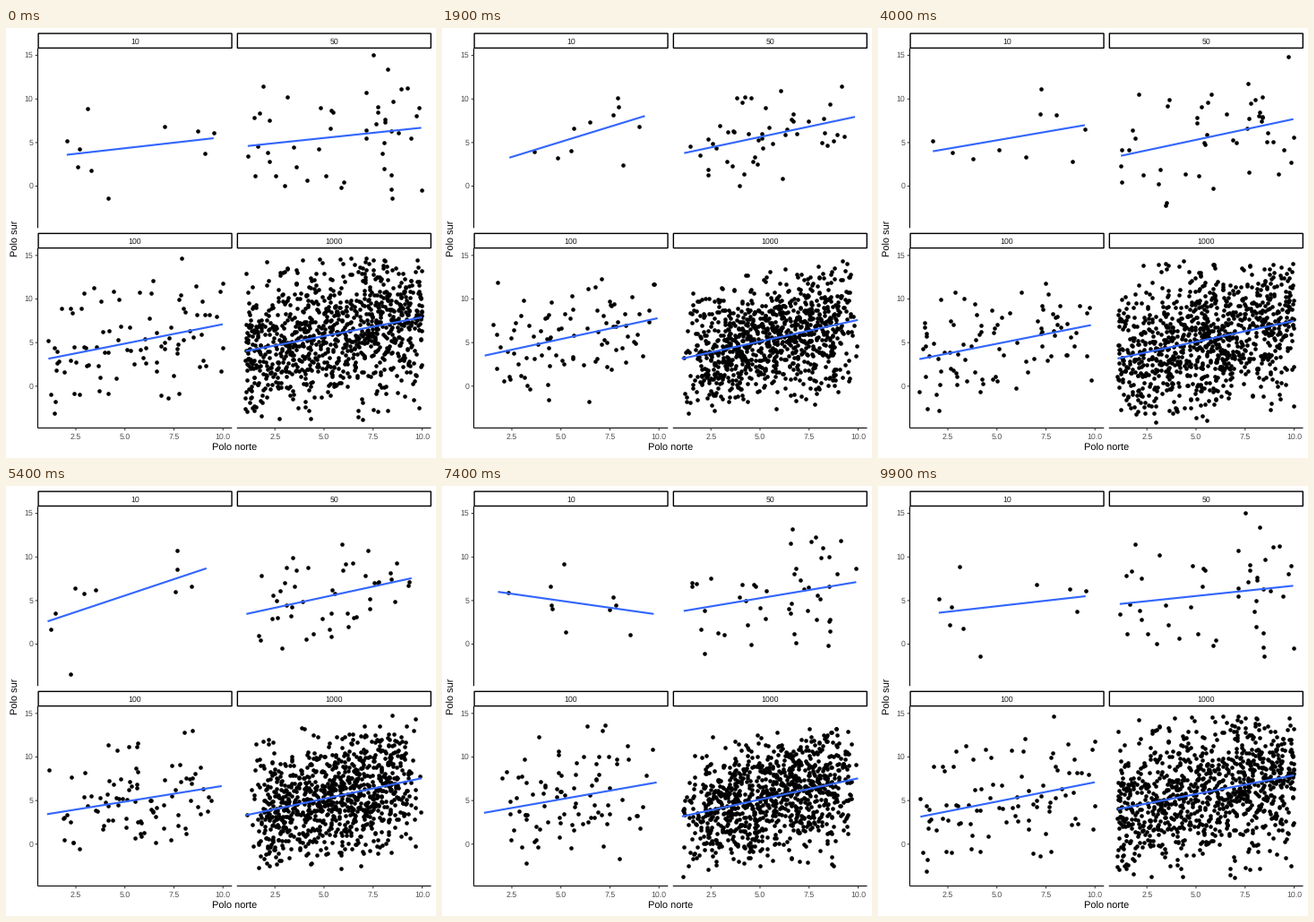
Recreate the animation shown at these times as a matplotlib script. Size 480 by 480 pixels, loop 10000 ms.

```python
import numpy as np
import matplotlib.pyplot as plt
from matplotlib.animation import FuncAnimation
from matplotlib.patches import Rectangle

plt.rcParams["font.family"] = "Liberation Sans"
plt.rcParams["text.hinting"] = "none"

SIZE = 480
FRAMES, STATES = 100, 10
LEFT, STRIP_TOP = (35.5, 257.75), (5.5, 228.75)
PANEL_W, STRIP_H, PANEL_H = 216.75, 17.05, 200.7
X_UNIT, Y_UNIT = 21.9, 9.73
X_MIN, Y_MIN = 0.56, -4.8
Y_LOW, Y_HIGH = -3.8, 14.8
NOISE = 4
SAMPLES = {10: 10, 50: 48, 100: 90, 1000: 980}  # points left within the limits

# Trend heights at both ends; the smallest sample swings widely between states
TREND = (3.4, 7.6)
SWINGS = [(3.6, 5.5), (4.6, 5.8), (3.0, 8.5), (1.2, 9.4), (4.0, 7.0),
          (2.4, 9.0), (3.7, 7.2), (6.6, 2.8), (3.0, 6.8), (3.8, 5.5)]

rng = np.random.default_rng(12)


def sample(n, ends):
    """Random points whose least-squares line has the given end heights."""
    x = rng.uniform(1, 10, n)
    span = x.min(), x.max()
    trend = np.interp(x, span, ends)
    y = trend + rng.normal(0, NOISE, n)
    while (bad := (y < Y_LOW) | (y > Y_HIGH)).any():
        y[bad] = trend[bad] + rng.normal(0, NOISE, bad.sum())
    y += trend - np.polyval(np.polyfit(x, y, 1), x)
    return np.array([x, y]), np.array([span, ends])


def make_states(n):
    if n == 10:
        ends = SWINGS
    else:
        ends = rng.normal(TREND, 5.6 / np.sqrt(n), (STATES, 2))
    points, lines = zip(*(sample(SAMPLES[n], e) for e in ends))
    return points, lines


def tween(states, i):
    """Rest on each state, then move evenly to the next one."""
    for k in range(STATES):
        end = 10 * (k + 1) - (k >= STATES // 2)
        if i <= end:
            steps = 7 if k == 0 else 6
            f = max(0, (i - end + steps) / steps)
            return states[k] * (1 - f) + states[(k + 1) % STATES] * f


fig = plt.figure(figsize=(SIZE / 72, SIZE / 72), dpi=72, facecolor="white")
ax = fig.add_axes([0, 0, 1, 1])
ax.set(xlim=(0, SIZE), ylim=(SIZE, 0))
ax.axis("off")


def label(x, y, text, size=8.8, color="#4d4d4d", ha="center", **kw):
    ax.text(x, y, text, size=size, color=color, ha=ha, va="baseline", **kw)


def rule(xs, ys, color="black"):
    ax.plot(xs, ys, color=color, lw=1.07, solid_capstyle="butt",
            snap=False, zorder=4)


class Panel:
    def __init__(self, n, col, row):
        self.left, self.top = LEFT[col], STRIP_TOP[row]
        self.right = self.left + PANEL_W
        self.bottom = self.top + STRIP_H + PANEL_H
        self.points, self.lines = make_states(n)
        self.dots, = ax.plot([], [], "o", color="black", ms=4.6, mew=0,
                             snap=False, zorder=2)
        self.line, = ax.plot([], [], color="#3366ff", lw=2.13, snap=False,
                             solid_capstyle="butt", zorder=3)
        self.draw_strip(n)
        if col == 0:
            self.draw_y_axis()
        if row == 1:
            self.draw_x_axis()

    def to_px(self, x, y):
        return (self.left + (x - X_MIN) * X_UNIT,
                self.bottom - (y - Y_MIN) * Y_UNIT)

    def draw_strip(self, n):
        ax.add_patch(Rectangle((self.left + 0.6, self.top + 0.6),
                               PANEL_W - 0.8, STRIP_H - 0.8, fc="white",
                               ec="black", lw=1.4, snap=False, zorder=4))
        label((self.left + self.right) / 2, self.top + 12.3, str(n),
              color="#1a1a1a", zorder=5)

    def draw_y_axis(self):
        rule([self.left] * 2, [self.top + STRIP_H, self.bottom])
        for v in (0, 5, 10, 15):
            _, y = self.to_px(0, v)
            rule([self.left - 2.75, self.left], [y, y], "#333333")
            label(self.left - 5, y + 2.8, str(v), ha="right")

    def draw_x_axis(self):
        rule([self.left, self.right], [self.bottom] * 2)
        for v in (2.5, 5, 7.5, 10):
            x, _ = self.to_px(v, 0)
            rule([x, x], [self.bottom, self.bottom + 2.75], "#333333")
            label(x, self.bottom + 12.3, f"{v:.1f}")

    def update(self, i):
        self.dots.set_data(*self.to_px(*tween(self.points, i)))
        self.line.set_data(*self.to_px(*tween(self.lines, i)))
        return self.dots, self.line


panels = [Panel(n, j % 2, j // 2) for j, n in enumerate(SAMPLES)]
label(255, 471.5, "Polo norte", size=11, color="black")
label(14, 234.5, "Polo sur", size=11, color="black",
      rotation=90, rotation_mode="anchor")


def update(i):
    return [artist for p in panels for artist in p.update(i)]


anim = FuncAnimation(fig, update, frames=FRAMES, interval=100,
                     repeat=True, repeat_delay=0)
plt.show()
```
